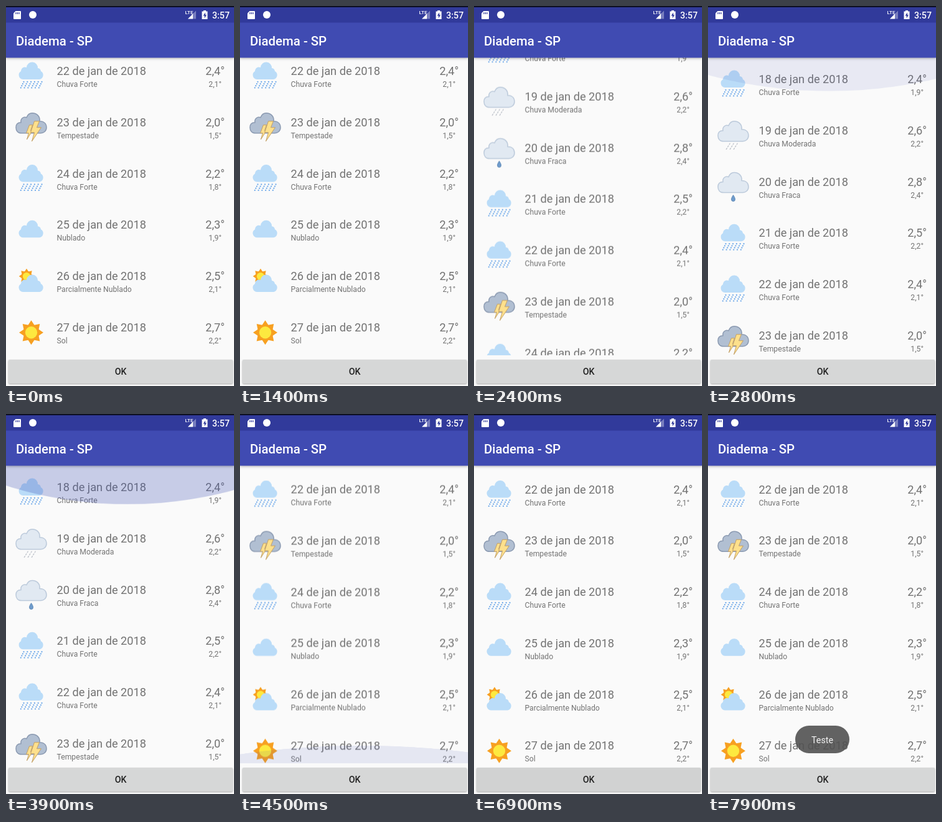
An HTML page for the animation above (8 s loop, 366 by 606 pixels).

```html
<!DOCTYPE html>
<html lang="pt-BR">
<head>
<meta charset="utf-8">
<title>Previsão do tempo</title>
<style>
  html, body { margin: 0; width: 100%; height: 100%; overflow: hidden; background: #fafafa; }
  svg { display: block; width: 366px; height: 606px; font-family: Roboto, sans-serif; }
  .date { font-size: 18.2px; fill: #737373; }
  .small { font-size: 12.2px; fill: #737373; }
  .mid { text-anchor: middle; }
  .medium { font-weight: 500; }
  #bar { filter: drop-shadow(0 1.5px 2px rgba(0, 0, 0, .3)); }
  #button { filter: drop-shadow(0 1px 1px rgba(0, 0, 0, .35)); }
  .glow, #ripple, #toast { opacity: 0; }
</style>
</head>
<body>
<svg viewBox="0 0 366 606">
  <defs>
    <clipPath id="view"><rect y="82" width="366" height="475"/></clipPath>
    <clipPath id="face"><rect x="4" y="564" width="360" height="38" rx="2"/></clipPath>
    <path id="puff" d="M7 25A7 7 0 0 1 4 12A6.500 6.500 0 0 1 13 6A9 9 0 0 1 31 7A6 6 0 0 1 36 12A7 7 0 0 1 34 25Z" fill="#badcf8"/>
    <path id="cloud" d="M9 33C3 33 0 29 0 24C0 19 3 16 8 16C7 10 12 6 17 8C19 3 22 1 26 1C34 1 39 7 38 14C45 14 49 18 49 24C49 30 44 33 40 33Z" stroke-width="1.500"/>
    <g id="sol"></g>
    <g id="nublado"><use href="#puff" x="-20.500" y="-13"/></g>
    <g id="parcial">
      <use href="#sol" transform="translate(-7.500 -8) scale(.63)"/>
      <use href="#puff" x="-20.500" y="-8"/>
    </g>
    <g id="forte"><use href="#puff" x="-20.500" y="-20"/></g>
    <g id="moderada">
      <use href="#cloud" x="-24.500" y="-24" fill="#e1e9f2" stroke="#bccadb"/>
      <path d="M-5 12l-7 11M1 12l-7 11M7 12l-7 11" stroke="#b9bec6" stroke-width="1.200" stroke-dasharray="3 1.500"/>
    </g>
    <g id="fraca">
      <use href="#cloud" x="-24.500" y="-24" fill="#e1e9f2" stroke="#bccadb"/>
      <path d="M0 13C-2 16-3 18-3 20A3 3 0 0 0 3 20C3 18 2 16 0 13Z" fill="#6f9ccc" stroke="#557fae" stroke-width=".8"/>
    </g>
    <g id="tempestade">
      <use href="#cloud" x="-24.500" y="-24" fill="#b1bfd2" stroke="#8b9ab1"/>
      <g fill="#fde08c" stroke="#c29f66" stroke-linejoin="round">
        <path d="M-3-4H2L-1 5H2L-7 19L-4 9H-8Z"/>
        <path d="M5-10H13L9 0H16L1 22L5 8H-1Z"/>
      </g>
    </g>
  </defs>

  <rect width="366" height="606" fill="#fafafa"/>
  <g clip-path="url(#view)">
    <g id="list"></g>
    <g transform="translate(195 83)"><ellipse class="glow" id="topGlow"/></g>
    <g transform="translate(195 557) scale(1 -1)"><ellipse class="glow" id="endGlow"/></g>
  </g>

  <g id="bar"><rect y="26" width="366" height="56.500" fill="#404bb2"/></g>
  <rect width="366" height="26.500" fill="#313a9b"/>
  <rect width="366" height="2" fill="#0d1024"/>
  <g fill="#fff">
    <path d="M15.500 8H23a1 1 0 0 1 1 1V20a1 1 0 0 1-1 1H13a1 1 0 0 1-1-1V11.500Z"/>
    <path d="M16 10v3M18.500 10v3M21 10v3" stroke="#313a9b" stroke-width="1.200"/>
    <circle cx="43" cy="14" r="6"/>
    <text x="287.500" y="13" font-size="8" class="medium">LTE</text>
    <path d="M305 7.500V20.500H292Z" opacity=".35"/>
    <path d="M300 12.500V20.500H292Z"/>
    <path d="M317 7h4v1.500h2.500V21h-9V8.500H317Z"/>
    <path d="M320 10.500l-3.500 5h2.200v4l3.300-5.200h-2Z" fill="#313a9b"/>
    <text x="331" y="19.500" font-size="14.200" class="medium">3:57</text>
    <text x="16" y="63" font-size="20.400" class="medium">Diadema - SP</text>
  </g>

  <g id="button"><rect x="4" y="564" width="360" height="38" rx="2" fill="#d6d7d7"/></g>
  <g clip-path="url(#face)"><g transform="translate(184 583)"><circle id="ripple" r="185"/></g></g>
  <text x="184" y="588" font-size="14.200" class="medium mid" fill="#212121">OK</text>

  <g id="toast">
    <rect x="140" y="497" width="87" height="44" rx="22" fill="#525252" fill-opacity=".9"/>
    <text x="183.500" y="524.500" font-size="14.300" class="mid" fill="#f4f4f4">Teste</text>
  </g>
</svg>
<script>
const LOOP = 8000, PITCH = 81.75, TOP = 83;
const byId = id => document.getElementById(id);

// Sun: eight pointed rays around a disc
const rays = Array.from({ length: 16 }, (_, i) => {
  const a = i * Math.PI / 8, r = i % 2 ? 13 : 19.5;
  return [r * Math.sin(a), -r * Math.cos(a)];
}).join(' ');
byId('sol').innerHTML =
  `<polygon points="${rays}" fill="#f7a021"/><circle r="13" fill="#f7a021"/><circle r="9.7" fill="#fde93f"/>`;

// Heavy rain: slanted rows of dots
const streaks = Array.from({ length: 6 }, (_, i) => `M${-12 + i * 5.8} 9l-5 10`).join('');
byId('forte').insertAdjacentHTML('beforeend',
  `<path d="${streaks}" stroke="#72abea" stroke-width="2.3" stroke-linecap="round" stroke-dasharray="0 3.5"/>`);

const labels = {
  forte: 'Chuva Forte', moderada: 'Chuva Moderada', fraca: 'Chuva Fraca', tempestade: 'Tempestade',
  nublado: 'Nublado', parcial: 'Parcialmente Nublado', sol: 'Sol',
};
const forecast = `forte 2,4 1,9; moderada 2,6 2,2; fraca 2,8 2,4; forte 2,5 2,2; forte 2,4 2,1;
  tempestade 2,0 1,5; forte 2,2 1,8; nublado 2,3 1,9; parcial 2,5 2,1; sol 2,7 2,2`;

byId('list').innerHTML = forecast.split(/;\s*/).map((day, i) => {
  const [icon, high, low] = day.split(' ');
  return `<g transform="translate(0 ${TOP + i * PITCH})">
    <use href="#${icon}" x="40.5" y="42"/>
    <text class="date" x="81.5" y="40.2">${18 + i} de jan de 2018</text>
    <text class="small" x="81.5" y="59">${labels[icon]}</text>
    <text class="date mid" x="335.7" y="40.2">${high}°</text>
    <text class="small mid" x="335.7" y="59">${low}°</text>
  </g>`;
}).join('');

// Edge glow: the cap of a wide circle, squashed towards the edge
const radius = 549, cap = 73.6;
for (const el of document.querySelectorAll('.glow')) {
  el.setAttribute('rx', radius);
  el.setAttribute('ry', radius);
  el.setAttribute('cy', cap - radius);
  el.setAttribute('fill', '#3f51b5');
}

// Each step is [ms, style], eased to the next; both ends are held
function play(id, easing, ...steps) {
  const all = [[0, steps[0][1]], ...steps, [LOOP, steps.at(-1)[1]]];
  const frames = all.map(([t, style]) => ({ offset: t / LOOP, easing, ...style }));
  byId(id).animate(frames, { duration: LOOP, iterations: Infinity }).startTime = 0;
}

const scroll = y => ({ transform: `translateY(${-y}px)` });
const glow = (opacity, s) => ({ opacity, transform: `scale(1, ${s})` });
const ripple = (opacity, s) => ({ opacity, transform: `scale(${s})` });
const lift = y => ({ filter: `drop-shadow(0 ${y}px ${y}px rgba(0, 0, 0, .35))` });

const END = 340, REST = 323.5;
play('list', 'ease-in-out',
  [1700, scroll(END)], [2670, scroll(0)], [3950, scroll(0)], [4350, scroll(END)], [4500, scroll(REST)]);

play('topGlow', 'ease-out',
  [2550, glow(0, .65)], [3600, glow(.27, .83)], [3900, glow(.27, .83)], [4250, glow(0, .3)]);
play('endGlow', 'linear',
  [4300, glow(0, .2)], [4400, glow(.13, .45)], [5000, glow(0, .05)]);

play('ripple', 'ease-out',
  [6400, ripple(0, .15)], [6650, ripple(.12, 1)], [7050, ripple(0, 1)]);
play('button', 'ease-out',
  [6400, lift(1)], [6550, lift(2.5)], [6950, lift(1)]);
play('toast', 'linear',
  [7000, { opacity: 0 }], [7400, { opacity: 1 }]);
</script>
</body>
</html>
```
